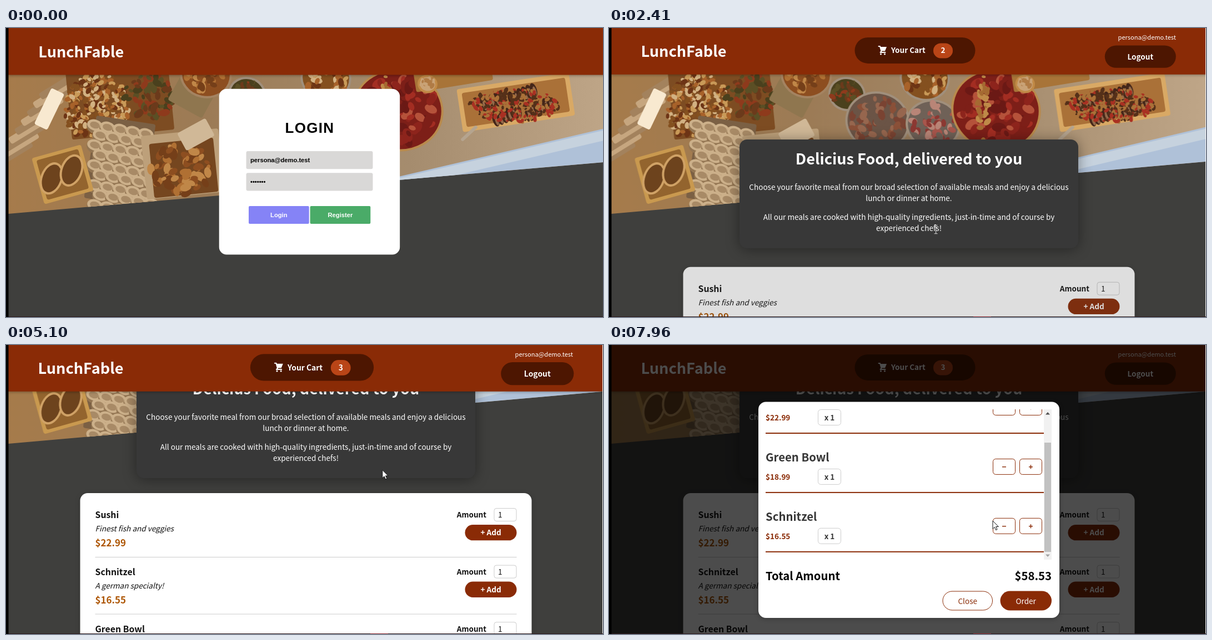
An HTML page with a canvas that plays this animation: 1075x521 px, repeating every 8 s.

```html
<!DOCTYPE html>
<html lang="en">
<head>
<meta charset="utf-8">
<title>Meals</title>
<style>
html, body { margin: 0; width: 1075px; height: 521px; overflow: hidden; background: #3f3f3d; }
canvas { display: block; }
</style>
</head>
<body>
<canvas id="stage" width="1075" height="521"></canvas>
<script>
const W = 1075, H = 521, LOOP = 8000, REM = 13.55, TAU = Math.PI * 2;
const BRAND = 'LunchFable', EMAIL = 'persona@demo.test';
const SANS = '"Noto Sans CJK JP", "Noto Sans CJK SC", "Noto Sans CJK", sans-serif';
const ARIAL = '"Liberation Sans", Arial, sans-serif';
const RUST = '#8a2b06', DARK = '#3f3f3d', COCOA = '#4d1601';
const PAGE_AT = 1720, ANIM_AT = 1757, MEALS_AT = 2050, ADD_AT = 4852, MODAL_AT = 6156;
const MEALS = [
  { name: 'Sushi', note: 'Finest fish and veggies', price: 22.99 },
  { name: 'Schnitzel', note: 'A german specialty!', price: 16.55 },
  { name: 'Green Bowl', note: 'Healthy...and green...', price: 18.99 }
];
const CART = [MEALS[0], MEALS[2], MEALS[1]];
const money = v => '$' + v.toFixed(2);

// Cursor: start and end time of each move, and where it goes
const MOVES = [
  [150, 700, 490, 338], [950, 1200, 560, 242], [1400, 1760, 493, 380], [1900, 2600, 624, 357],
  [3180, 3560, 862, 338], [3700, 4300, 866, 441], [4852, 5100, 678, 226], [5100, 5380, 625, 49],
  [6480, 7130, 691, 317]
];

const canvas = document.getElementById('stage');
let g = canvas.getContext('2d');
let mouse, cursor, blocked;

const clamp = v => Math.max(0, Math.min(1, v));
const mix = (a, b, p) => a + (b - a) * p;
const smooth = v => { v = clamp(v); return v * v * (3 - 2 * v); };

// CSS ease-out, solved by bisection
function easeOut(x) {
  x = clamp(x);
  let lo = 0, hi = 1;
  for (let i = 0; i < 20; i++) {
    const s = (lo + hi) / 2;
    if (1.74 * (1 - s) * s * s + s ** 3 < x) lo = s; else hi = s;
  }
  return smooth(hi);
}

function bump(t) {
  const keys = [[0, 1], [.1, .9], [.3, 1.1], [.5, 1.15], [1, 1]], p = t / 300;
  if (p <= 0 || p >= 1) return 1;
  const i = keys.findIndex(k => k[0] > p), [a, va] = keys[i - 1], [b, vb] = keys[i];
  return mix(va, vb, easeOut((p - a) / (b - a)));
}

function mouseAt(t) {
  let x = 800, y = 535;
  for (const [from, to, u, v] of MOVES) {
    const p = clamp((t - from) / (to - from));
    x = mix(x, u, p);
    y = mix(y, v, p);
  }
  return [x, y];
}

function over(x, y, w, h, kind = 'hand') {
  const hit = !blocked && mouse[0] >= x && mouse[0] <= x + w && mouse[1] >= y && mouse[1] <= y + h;
  if (hit) cursor = kind;
  return hit;
}

function box(x, y, w, h, r, fill, stroke) {
  g.beginPath();
  g.roundRect(x, y, w, h, r);
  if (fill) { g.fillStyle = fill; g.fill(); }
  if (stroke) { g.strokeStyle = stroke; g.lineWidth = 1; g.stroke(); }
}

function shadowBox(x, y, w, h, r, fill, blur, alpha, dy) {
  g.save();
  g.shadowColor = `rgba(0,0,0,${alpha})`;
  g.shadowBlur = blur;
  g.shadowOffsetY = dy;
  box(x, y, w, h, r, fill);
  g.restore();
}

// y is the middle of the capital letters; the baseline sits on a whole pixel
function text(str, x, y, size, color, { bold = false, italic = false, align = 'left', family = SANS } = {}) {
  g.font = `${italic ? 'italic ' : ''}${bold ? 'bold ' : ''}${size}px ${family}`;
  g.textAlign = align;
  g.fillStyle = color;
  g.fillText(str, x, Math.round(y + size * .3665));
}

function at(x, y, scale, turn, draw) {
  g.save();
  g.translate(x, y);
  g.rotate(turn);
  g.scale(scale, scale);
  draw();
  g.restore();
}

const slab = (x, y, w, h, turn, fill) => at(x, y, 1, turn, () => box(-w / 2, -h / 2, w, h, 4, fill));

function oval(x, y, rx, ry, fill, turn = 0, rim) {
  g.beginPath();
  g.ellipse(x, y, rx, ry, turn, 0, TAU);
  g.fillStyle = fill;
  g.fill();
  if (rim) { g.strokeStyle = rim; g.lineWidth = 4; g.stroke(); }
}

function makePhoto() {
  const sheet = document.createElement('canvas'), screen = g;
  sheet.width = 1090;
  sheet.height = 340;
  g = sheet.getContext('2d');
  let seed = 7;
  const rnd = () => (seed = seed * 16807 % 2147483647) / 2147483647;
  const scatter = (x, y, rx, ry, size, colors) => {
    const count = rx * ry / size / size * 2;
    for (let i = 0; i < count; i++) {
      const a = rnd() * TAU, d = Math.sqrt(rnd()), s = size * (.6 + rnd() * .8);
      oval(x + Math.cos(a) * d * rx, y + Math.sin(a) * d * ry, s, s * .65, colors[i % colors.length], rnd() * 3);
    }
  };
  const platter = (x, y, r, rim, colors) => {
    oval(x, y, r, r * .9, colors[0], .2, rim);
    scatter(x, y, r * .85, r * .75, 3 + r / 12, colors);
  };
  const bread = ['#8d4e20', '#b07033', '#753f19', '#c08748'];
  const salad = ['#84501f', '#c99a58', '#6d3415', '#d2b182', '#a8622a'];
  const greens = ['#4a401d', '#6b3a1b', '#8e3a1c', '#5b4f25'];
  const ham = ['#7d1f18', '#a32d22', '#6b1915', '#b5523a', '#8d241c'];
  const pewter = '#a08f7c';

  // the lower edge slopes up by five degrees
  const edge = x => 335 - (x - 4) * .0869;
  g.beginPath();
  g.moveTo(4, 0);
  g.lineTo(1090, 0);
  g.lineTo(1090, edge(1090));
  g.lineTo(4, edge(4));
  g.clip();
  const cloth = g.createLinearGradient(0, 0, 1090, 0);
  ['#a67b4b', '#9c7b56', '#a58c6e', '#bfa688'].forEach((c, i) => cloth.addColorStop(i / 3, c));
  g.fillStyle = cloth;
  g.fillRect(0, 0, 1090, 340);

  // folded linen on the left
  for (let i = 0; i < 9; i++) slab(10 + i * 11, 230 - i * 16, 85, 13, -.55, i % 2 ? '#c6a67f' : '#a3825d');
  slab(78, 146, 26, 72, .45, '#f8e9d0');

  slab(205, 130, 185, 125, -.1, '#7d4c22');
  scatter(165, 145, 60, 62, 5, salad);
  scatter(258, 124, 46, 40, 7, greens);
  slab(335, 122, 70, 55, .5, '#8f764f');

  slab(205, 240, 108, 150, .15, '#7b6044');
  for (let i = 0; i < 45; i++) {
    const row = Math.floor(i / 5), x = 160 + i % 5 * 23 + row % 2 * 10, y = 178 + row * 18 + i % 5 * 4;
    oval(x, y, 15, 12, '#937552', .3);
    oval(x, y - 3, 14, 10, '#ccb08a', .3);
    oval(x, y - 3, 9, 6, '#a88a66', .3);
  }

  slab(102, 264, 92, 86, -.27, '#c9994f');
  slab(102, 264, 78, 74, -.27, '#93642e');
  for (const side of [-18, 18]) oval(100 + side, 264 - side * .4, 18, 28, '#6d431d', .35, '#d0a266');

  slab(318, 245, 140, 115, -.1, '#bda07a');
  slab(320, 252, 116, 98, -.1, '#75461f');
  scatter(315, 255, 55, 44, 8, bread);
  slab(342, 192, 58, 36, -.5, '#d0b897');

  platter(360, 84, 45, '#a48361', bread);
  platter(434, 119, 32, pewter, greens);
  platter(576, 90, 44, pewter, salad);
  platter(490, 168, 57, pewter, ['#6b5446', '#8a5038', '#7a4332', '#96664e']);
  platter(591, 174, 48, pewter, ['#6f6157', '#a8564c', '#8c3832', '#b98577']);
  platter(706, 148, 80, '#b98a4c', ham);
  scatter(682, 145, 10, 62, 6, ['#bf8a48', '#a56a32']);

  // dessert tray
  slab(805, 85, 140, 40, -.16, '#a87438');
  platter(759, 101, 16, '#c18a47', ['#c9a276', '#b07b45']);
  slab(918, 134, 204, 78, -.15, '#d9a965');
  slab(918, 134, 188, 62, -.15, '#aa7138');
  for (let i = 0; i < 24; i++) {
    const cake = Math.floor(i / 6), low = cake >> 1, right = cake % 2;
    const x = 852 + right * 58 + low * 30 + i % 6 * 8, y = 141 - right * 14 + low * 24 - i % 6 * 3;
    oval(x, y, 6, 13, '#442619', -.3);
    oval(x + 2, y + 2, 3, 9, '#94694a', -.3);
  }
  scatter(915, 139, 80, 30, 4, ['#a93022', '#553019', '#aa7138']);

  // pale blue table skirt
  slab(930, 262, 500, 90, -.23, '#afc1d8');
  slab(930, 228, 500, 18, -.23, '#c6d2de');
  slab(834, 190, 38, 6, -.75, '#b5a48f');
  g = screen;
  return sheet;
}

const photo = makePhoto();

function login() {
  box(383.7, 109.8, 325.5, 298.7, REM, '#fff');
  g.letterSpacing = '1.3px';
  text('LOGIN', 547, 179.5, 26, '#000', { bold: true, align: 'center', family: ARIAL });
  g.letterSpacing = '0px';
  [EMAIL, '•'.repeat(7)].forEach((value, i) => {
    const y = 222 + i * 39.2;
    box(432.5, y, 228, 32.3, 3, '#d9d8d7');
    text(value, 440, y + 16, 11.2, '#000', { bold: true, family: ARIAL });
    over(432, y, 228, 32, 'beam');
  });
  [['Login', '#8583f6', '#6d6be0'], ['Register', '#4aab68', '#3a9157']].forEach(([label, color, hot], i) => {
    const x = 437 + i * 110.6;
    box(x, 321, 108.7, 32, 2, over(x, 321, 108, 32) ? hot : color);
    text(label, x + 54.3, 337, 11.2, '#fff', { bold: true, family: ARIAL, align: 'center' });
  });
}

function hero(cx, scroll) {
  const y = -scroll;
  const paragraph = (lines, top) => lines.forEach((line, i) =>
    text(line, cx, top + i * 19.8 + y, REM, '#fff', { align: 'center' }));
  shadowBox(cx - 305, 201 + y, 610, 196, REM, '#383838', 24, .4, 2);
  text('Delicius Food, delivered to you', cx, 236.5 + y, 2 * REM, '#fff', { bold: true, align: 'center' });
  paragraph(['Choose your favorite meal from our broad selection of available meals and enjoy a delicious',
    'lunch or dinner at home.'], 287.5);
  paragraph(['All our meals are cooked with high-quality ingredients, just-in-time and of course by',
    'experienced chefs!'], 341);
  over(cx - 290, 278 + y, 580, 93, 'beam');
}

function meals(t, cx, scroll) {
  const shown = easeOut((t - ANIM_AT) / 1000), loaded = t >= MEALS_AT;
  if (shown <= 0) return;
  const left = cx - 406.5, right = cx + 379.5;
  const top = 424 - scroll + (1 - shown) * 3 * REM, height = loaded ? 437 : 2 * REM;
  shadowBox(left, top, 813, height, REM, '#fff', 8, .25 * shown, 2);
  if (loaded) MEALS.forEach(({ name, note, price }, i) => {
    const y = top + i * 102.6;
    text(name, left + 27, y + 39.5, 1.17 * REM, '#111', { bold: true });
    text(note, left + 27, y + 64.5, REM, '#111', { italic: true });
    text(money(price), left + 27, y + 90, 1.25 * REM, '#ad5502', { bold: true });
    text('Amount', right - 54.5, y + 39.5, REM, '#111', { bold: true, align: 'right' });
    box(right - 40.5, y + 27.5, 40, 23, 4, '#fff', '#ccc');
    text('1', right - 33.5, y + 39.5, REM, '#111');
    const hot = over(right - 93, y + 57, 93, 28), pressed = hot && t > 4760;
    box(right - 93, y + 57, 93, 28.3, 15, pressed ? COCOA : hot ? '#641e03' : RUST);
    text('+ Add', right - 46.5, y + 71.5, REM, '#fff', { bold: true, align: 'center' });
    g.fillStyle = '#ccc';
    g.fillRect(left + 27, y + 115, 759, 1);
  });
  if (shown < 1) {
    g.globalAlpha = 1 - shown;
    box(left - 1, top - 1, 815, height + 2, REM, DARK);
    g.globalAlpha = 1;
  }
}

function cartIcon() {
  g.strokeStyle = g.fillStyle = '#fff';
  g.lineWidth = 2;
  g.lineJoin = g.lineCap = 'round';
  g.stroke(new Path2D('M1 1H3.5L6 10L4 12H13'));
  g.fill(new Path2D('M4 2H15.5L12.5 9.5H6Z'));
  oval(5, 15, 1.5, 1.5, '#fff');
  oval(12, 15, 1.5, 1.5, '#fff');
}

function header(t, narrow) {
  const dy = narrow ? 0 : .8, dx = narrow ? 0 : 7;
  shadowBox(4, -10, 1090, 93.7 + dy, 0, RUST, 5, .3, 1);
  text(BRAND, narrow ? 57.5 : 58.3, 42.3 + dy, 2 * REM, '#fff', { bold: true });
  if (t < PAGE_AT) return;
  const size = bump(t - ANIM_AT) * bump(t - ADD_AT);
  text(EMAIL, 1021 + 2 * dx, 17 + dy, 11.1, '#fff', { align: 'right' });
  const hot = over(443 + dx, 17, 217, 47);
  at(551 + dx, 40.4 + dy, size, 0, () => {
    box(-108.5, -23.5, 217, 47, 23.5, hot ? '#2c0d00' : COCOA);
    at(-66.5, -8.5, 1, 0, cartIcon);
    text('Your Cart', -43, .5, REM, '#fff', { bold: true });
    box(33, -13, 35, 27, 13.5, '#b94517');
    text(t < ADD_AT ? '2' : '3', 50.5, .5, REM, '#fff', { bold: true, align: 'center' });
  });
  at(956.8 + 2 * dx, 51.6 + dy, size, 0, () => {
    box(-64, -20.2, 128, 40.4, 20.2, COCOA);
    text('Logout', 0, .5, REM, '#fff', { bold: true, align: 'center' });
  });
}

function triangle(x, y, dir, active) {
  g.fillStyle = active ? '#505050' : '#a3a3a3';
  g.beginPath();
  g.moveTo(x - 4, y + 2 * dir);
  g.lineTo(x + 4, y + 2 * dir);
  g.lineTo(x, y - 2.5 * dir);
  g.fill();
}

function cartList(scrolled) {
  g.beginPath();
  g.rect(282, 116, 515, 271);
  g.clip();
  CART.forEach(({ name, price }, i) => {
    const y = i * 106.9 - 63 * scrolled;
    text(name, 282, 159 + y, 1.5 * REM, '#363636', { bold: true });
    text(money(price), 282, 194.5 + y, REM, RUST, { bold: true });
    box(376.5, 179.5 + y, 41, 28, 5, null, '#ccc');
    text('x 1', 397, 194.5 + y, REM, '#363636', { bold: true, align: 'center' });
    ['−', '+'].forEach((sign, k) => {
      const x = 691.5 + k * 48, hot = over(x, 161 + y, 40, 28);
      box(x, 161.5 + y, 40, 28, 5, hot ? RUST : null, RUST);
      text(sign, x + 20, 176 + y, REM, hot ? '#fff' : RUST, { bold: true, align: 'center' });
    });
    g.fillStyle = RUST;
    g.fillRect(282, 221 + y, 501, 2);
  });
  box(783, 116, 14, 271, 0, '#f1f1f1');
  box(784, 130 + 46 * scrolled, 12, 197, 0, '#c1c1c1');
  triangle(790, 123.5, 1, scrolled > 0);
  triangle(790, 379.5, -1, scrolled < 1);
}

function modal(t) {
  const shown = easeOut((t - MODAL_AT) / 300);
  const total = CART.reduce((sum, item) => sum + item.price, 0);
  g.save();
  g.globalAlpha = shown;
  g.translate(0, (shown - 1) * 3 * REM);
  shadowBox(269, 102.5, 542, 389.5, REM, '#fff', 8, .25, 2);
  at(0, 0, 1, 0, () => cartList(smooth((t - 7270) / 580)));
  text('Total Amount', 282, 417, 1.5 * REM, '#000', { bold: true });
  text(money(total), 797, 417, 1.5 * REM, '#000', { bold: true, align: 'right' });
  box(601, 444, 89.5, 34, 17, null, RUST);
  text('Close', 645.7, 462, REM, RUST, { align: 'center' });
  box(704.5, 443.5, 92.5, 35, 17.5, RUST);
  text('Order', 750.7, 462, REM, '#fff', { align: 'center' });
  g.restore();
}

function pointer() {
  at(...mouse, 1, 0, () => {
    g.lineWidth = 1;
    g.lineJoin = 'round';
    g.strokeStyle = cursor === 'beam' ? '#ddd' : '#111';
    g.fillStyle = '#fff';
    const shape = new Path2D({
      beam: 'M-3 -7.5H3M0 -7V7M-3 7.5H3',
      hand: 'M-1.5 0Q0 -2 1.5 0V6L9 8L7.5 17H-1L-6 10L-1.5 10Z',
      arrow: 'M0 0V14.5L3.3 11.4L5.6 16.6L8 15.5L5.7 10.5H10.3Z'
    }[cursor]);
    if (cursor !== 'beam') g.fill(shape);
    g.stroke(shape);
  });
}

function render(t) {
  const narrow = t >= MEALS_AT, cx = narrow ? 540 : 546.5, wide = narrow ? .987 : 1;
  const scroll = 157 * smooth((t - 2510) / 500);
  mouse = mouseAt(t);
  cursor = 'arrow';
  blocked = t >= MODAL_AT;
  box(0, 0, W, H, 0, DARK);
  g.drawImage(photo, 4 * (1 - wide), -scroll, 1090 * wide, 340);
  if (t < PAGE_AT) login();
  else {
    hero(cx, scroll);
    meals(t, cx, scroll);
  }
  header(t, narrow);
  if (blocked) {
    box(0, 0, W, H, 0, 'rgba(0,0,0,.7)');
    blocked = false;
    modal(t);
  }
  if (narrow) box(1074, 0, 1, H, 0, '#f6f6f6');
  box(0, 520, W, 1, 0, '#2b171a');
  if (t >= PAGE_AT) box(656, 520, 32, 1, 0, '#86222c');
  box(0, 0, 4.5, H, 0, '#000');
  pointer();
}

const start = performance.now();
function tick() {
  render((performance.now() - start) % LOOP);
  requestAnimationFrame(tick);
}
tick();
</script>
</body>
</html>
```
